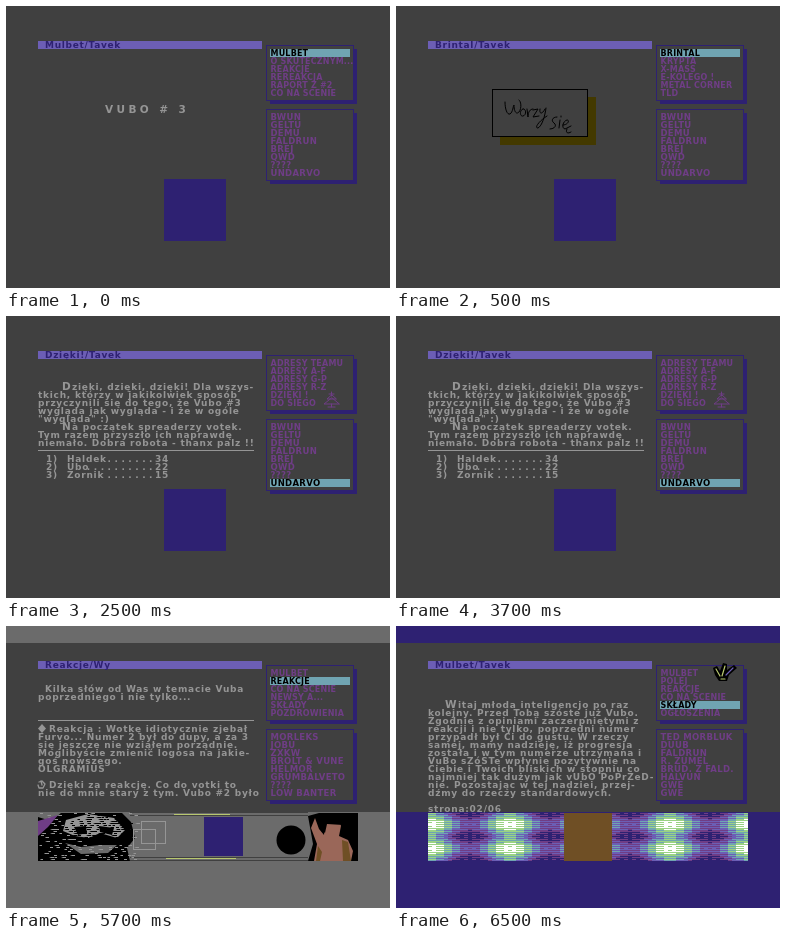
An HTML page that plays this animation: 384x282 px, repeating every 8 s.

```html
<!DOCTYPE html>
<html lang="pl">
<head>
<meta charset="utf-8">
<title>Magazyn dyskowy</title>
<style>
  html, body { margin: 0; width: 100%; height: 100%; overflow: hidden; background: #404040; }
  #stage { position: relative; width: 384px; height: 282px; overflow: hidden; }
  svg { position: absolute; left: 0; top: 0; opacity: 0; }
  text { font: bold 9px "DejaVu Sans", sans-serif; letter-spacing: .75px; white-space: pre; fill: #959595; }
  .title { fill: #2e2172; letter-spacing: .7px; }
  .menu { font-size: 8px; letter-spacing: .2px; fill: #6f3d86; }
  .names { font-size: 8.5px; letter-spacing: .3px; fill: #6f3d86; }
  .picked { fill: #000; }
  .wide { font-size: 10.5px; letter-spacing: 3.4px; }
  .cap { font-size: 10.5px; }
  .dots { letter-spacing: 3.5px; text-anchor: end; }
</style>
</head>
<body>
<div id="stage"></div>
<script>
const C = {
  black: '#000', white: '#fff', cyan: '#70a4b2', purple: '#6f3d86', blue: '#2e2172',
  yellow: '#b8c76f', orange: '#6f4f25', brown: '#433900', pink: '#9a6759',
  dark: '#404040', grey: '#6b6b6b', green: '#9ad284', lilac: '#6c5eb5', pale: '#959595'
};
const LOOP = 8000, LEFT = 32, TOP = 35, ROW = 8;

const esc = s => s.replace(/&/g, '&amp;').replace(/</g, '&lt;');
const rect = (x, y, w, h, fill, more = '') =>
  `<rect x="${x}" y="${y}" width="${w}" height="${h}" fill="${fill}" ${more}/>`;
const path = (d, fill, more = '') => `<path d="${d}" fill="${fill}" ${more}/>`;
const line = (d, stroke, width = 1) =>
  path(d, 'none', `stroke="${stroke}" stroke-width="${width}" stroke-linecap="round" stroke-linejoin="round"`);
const text = (s, x, y, cls = '') => `<text x="${x}" y="${y}" class="${cls}">${esc(s)}</text>`;

function random(seed) {
  return () => (seed = seed * 16807 % 2147483647) / 2147483647;
}

const baseline = row => TOP + ROW * row + 7;
const say = (s, row, x = LEFT, cls = '') => text(s, x, baseline(row), cls);
const para = (row, lines) => lines.map((s, i) => say(s, row + i)).join('');
const capital = (letter, rest, row, x, gap) =>
  say(letter, row, x, 'cap') + say(rest, row, x + gap);
const rule = row => rect(LEFT, TOP + ROW * row + 3, 216, 1, C.pale);

function title(s) {
  return rect(LEFT, TOP, 224, 8, C.lilac) + say(s, 0, 39, 'title');
}

function panel(y, items, picked, cls) {
  const h = items.length * ROW + 8;
  let out = rect(264, y + 4, 87, h - 1, C.blue) +
    rect(260.5, y + .5, 87, h - 1, C.dark, `stroke="${C.blue}"`);
  items.forEach((s, i) => {
    const top = y + 4 + i * ROW;
    if (i === picked) out += rect(264, top, 80, 8, C.cyan);
    out += text(s, 264.5, top + 7, cls + (i === picked ? ' picked' : ''));
  });
  return out;
}
const menus = (a, pickA, b, pickB) => panel(39, a, pickA, 'menu') + panel(103, b, pickB, 'names');

const emblem = rect(158, 173, 62, 62, C.blue);
const crew = ['BWUN', 'GELTU', 'DEMU', 'FALDRUN', 'BREJ', 'QWD', '????', 'UNDARVO'];

const votes = [['Haldek', 7, 34], ['Ubo', 10, 22], ['Zornik', 7, 15]].map(([who, dots, n], i) =>
  say(`${i + 1})`, 13 + i, 40) + say(who, 13 + i, 61) +
  say('.'.repeat(dots), 13 + i, 150, 'dots') + say(`${n}`, 13 + i, 149)).join('');

function note() {
  return rect(104, 91, 96, 48, C.brown) +
    rect(96.5, 83.5, 95, 47, C.dark, 'stroke="#000"') +
    line('M109 96 C109 103 111 109 114 108 C117 106 117 100 118 99 C118 105 120 109 123 106 ' +
      'C126 102 125 95 123 94 M127 103 C123 104 124 111 127 110 C131 109 130 102 127 103 ' +
      'M131 103 L132 111 C132 106 134 103 137 103 M137 104 L142 103 L137 111 L143 110 ' +
      'M144 103 C143 108 146 109 149 103 M150 102 C149 110 146 120 142 122 C138 122 143 115 151 110', C.black) +
    line('M161 111 C156 111 155 115 158 117 C161 119 159 123 154 123 M164 114 L163 122 M165 110 L165 111 ' +
      'M167 119 C172 119 174 114 171 114 C167 115 165 122 169 123 L175 120 M171 123 C169 127 172 128 175 126', C.black);
}

function tree() {
  return line('M325.5 76 V80 M323 78 H328 M325.5 79 L321 83 H330 Z M325.5 82 L318 88 H333 Z M325.5 88 V91 M322 91 H329', C.purple);
}

function quill() {
  return path('M317 42 L321 40 L324 45 L327 37 L331 38 L331 44 L338 39 L341 42 L333 49 L331 55 L323 55 L319 49 Z', C.black) +
    line('M329 40 L326 50 M320 43 L324 50 M325 53 H329', C.yellow, 1.2) +
    line('M337 42 L330 49', C.lilac, 1.2);
}

// Speckled dashes clustered around the skull
function speckle() {
  const rnd = random(11);
  let pale = '', black = '';
  for (let y = 187; y < 235; y += 2) {
    for (let x = 34; x < 126; x += 6) {
      const dash = `M${Math.round(x + rnd() * 5)} ${y}h${2 + Math.floor(rnd() * 4)}v1h-3z`;
      const inside = Math.hypot((x - 90) / 33, (y - 203) / 15) < 1;
      if (inside) black += dash;
      else if (rnd() < .4) pale += dash;
    }
  }
  return path(pale, C.pale) + path(black, C.black);
}

// Grey strip with skull, frames, disc and a figure
function gallery() {
  let out = rect(32, 186, 320, 49, C.grey);
  for (const y of [186, 189, 231, 234]) out += rect(124, y, 178, 1, C.dark);
  out += rect(168, 188, 56, 1, C.yellow) + rect(160, 232, 70, 1, C.yellow);
  out += path('M32 191 L45 195 L55 187 H116 L125 196 L129 212 L121 222 L124 235 H32 Z', C.black);
  out += path('M60 194 L82 188 L108 192 L119 204 L111 212 L94 207 L83 212 L69 210 L57 205 Z', C.pale);
  out += path('M59 217 L75 221 L94 219 L111 219 L102 227 L75 228 Z', C.grey);
  out += speckle();
  out += path('M68 201 L80 200 L81 207 L72 209 Z M93 200 L108 202 L106 209 L94 206 Z', C.black);
  out += path('M32 195 L52 189 L42 201 L32 210 Z', C.purple);
  out += rect(127.5, 203.5, 22, 20, 'none', 'stroke="#959595"');
  out += rect(135.5, 195.5, 24, 22, 'none', 'stroke="#959595"');
  out += rect(198, 191, 39, 39, C.blue);
  out += `<circle cx="285" cy="214" r="14.5" fill="${C.black}"/>`;
  out += path('M302 190 L313 187 H352 V235 H302 L307 218 Z', C.black);
  out += path('M308 235 L311 218 L305 202 L309 192 L313 203 L318 209 L319 199 C320 190 334 190 335 200 ' +
    'L333 210 L342 214 L347 225 L345 235 Z', C.pink);
  out += path('M314 202 L319 191 L331 190 L337 199 L321 198 L319 207 Z', C.black);
  out += path('M336 214 L342 216 L345 235 H337 Z M312 220 L316 226 L314 235 H310 Z', C.orange);
  return out;
}

// Ordered dither of bright lobes repeating across the strip
function weave() {
  const tones = [C.blue, C.purple, C.lilac, C.cyan, C.green, C.white];
  const bands = tones.map(() => '');
  const turn = 2 * Math.PI;
  for (let y = 187; y < 235; y++) {
    for (let x = 32; x < 352; x += 4) {
      const grain = (y % 2) * .7 + (x / 4 % 2) * .3 - .5;
      const v = 2.5 + 1.7 * Math.cos((x - 32) / 80 * turn) +
        .9 * Math.cos((y - 198) / 24 * turn) + 1.2 * grain;
      bands[Math.max(0, Math.min(5, Math.round(v)))] += `M${x} ${y}h4v1h-4z`;
    }
  }
  return bands.map((d, i) => path(d, tones[i], 'shape-rendering="crispEdges"')).join('');
}

const backdrop = colour => rect(0, 0, 384, 282, colour) + rect(0, 17, 384, 169, C.dark);
const plain = rect(0, 0, 384, 282, C.dark);

const scenes = [
  [500, plain + title('Mulbet/Tavek') +
    text('VUBO # 3', 99, 106.5, 'wide') +
    menus(['MULBET', 'O SKUTECZNYM...', 'REAKCJE', 'REREAKCJA', 'RAPORT Z #2', 'CO NA SCENIE'], 0, crew) +
    emblem],

  [2000, plain + title('Brintal/Tavek') + note() +
    menus(['BRINTAL', 'KRYPTA', 'X-MASS', 'E-KOLEGO !', 'METAL CORNER', 'TLD'], 0, crew) +
    emblem],

  [2000, plain + title('Dzięki!/Tavek') +
    capital('D', 'zięki, dzięki, dzięki! Dla wszys-', 4, 56, 10) +
    para(5, [
      'tkich, którzy w jakikolwiek sposób',
      'przyczynili się do tego, że Vubo #3',
      'wygląda jak wygląda - i że w ogóle',
      '"wygląda" :)']) +
    capital('N', 'a początek spreaderzy votek.', 9, 56, 10) +
    para(10, [
      'Tym razem przyszło ich naprawdę',
      'niemało. Dobra robota - thanx palz !!']) +
    rule(12) + votes +
    menus(['ADRESY TEAMU', 'ADRESY A-F', 'ADRESY G-P', 'ADRESY R-Z', 'DZIĘKI !', 'DO SIEGO'], -1, crew, 7) +
    tree() + emblem],

  [2000, backdrop(C.grey) + title('Reakcje/Wy') +
    say('Kilka słów od Was w temacie Vuba', 3, 39) +
    say('poprzedniego i nie tylko...', 4) +
    rule(7) +
    path('M36 98 L40 102.5 L36 107 L32 102.5 Z', C.pale) +
    say('Reakcja : Wotkę idiotycznie zjebał', 8, 43) +
    para(9, [
      'Furvo... Numer 2 był do dupy, a za 3',
      'się jeszcze nie wziąłem porządnie.',
      'Moglibyście zmienić logosa na jakie-',
      'goś nowszego.',
      'OLGRAMIUS']) +
    line('M33 156 L36 155 L39 158 L37 162 L33 162 L32 159 M35 155 L36 159', C.pale, 1.3) +
    say('Dzięki za reakcję. Co do votki to', 15, 43) +
    say('nie do mnie stary z tym. Vubo #2 było', 16) +
    menus(['MULBET', 'REAKCJE', 'CO NA SCENIE', 'NEWSY A...', 'SKŁADY', 'POZDROWIENIA'], 1,
      ['MORLEKS', 'JOBU', 'ZXKW', 'BROLT & VUNE', 'HELMOR', 'GRUMBALVETO', '????', 'LOW BANTER']) +
    gallery()],

  [1500, backdrop(C.blue) + title('Mulbet/Tavek') +
    capital('W', 'itaj młoda inteligencjo po raz', 5, 49, 13) +
    para(6, [
      'kolejny. Przed Tobą szóste już Vubo.',
      'Zgodnie z opiniami zaczerpniętymi z',
      'reakcji i nie tylko, poprzedni numer',
      'przypadł był Ci do gustu. W rzeczy',
      'samej, mamy nadzieję, iż progresja',
      'została i w tym numerze utrzymana i',
      'VuBo sZóSTe wpłynie pozytywnie na',
      'Ciebie i Twoich bliskich w stopniu co',
      'najmniej tak dużym jak vUbO PoPrZeD-',
      'nie. Pozostając w tej nadziei, przej-',
      'dźmy do rzeczy standardowych.']) +
    say('strona:02/06', 18) +
    menus(['MULBET', 'POLEJ', 'REAKCJE', 'CO NA SCENIE', 'SKŁADY', 'OGŁOSZENIA'], 4,
      ['TED MORBLUK', 'DUUB', 'FALDRUN', 'R. ZUMEL', 'BRUD. Z FALD.', 'HALVUN', 'GWE', 'GWE']) +
    quill() + weave() + rect(168, 187, 48, 48, C.orange)]
];

const stage = document.getElementById('stage');
stage.innerHTML = scenes.map(([, body]) =>
  `<svg width="384" height="282" viewBox="0 0 384 282">${body}</svg>`).join('');

let start = 0;
scenes.forEach(([hold], i) => {
  const on = start / LOOP, off = (start + hold) / LOOP;
  const steps = [[0, 0], [on, 0], [on, 1], [off, 1], [off, 0], [1, 0]]
    .filter(([at, o]) => !(at === 0 && on === 0 && o === 0) && !(at === 1 && off === 1 && o === 0));
  stage.children[i].animate(
    steps.map(([offset, opacity]) => ({ offset, opacity })),
    { duration: LOOP, iterations: Infinity });
  start += hold;
});
</script>
</body>
</html>
```
